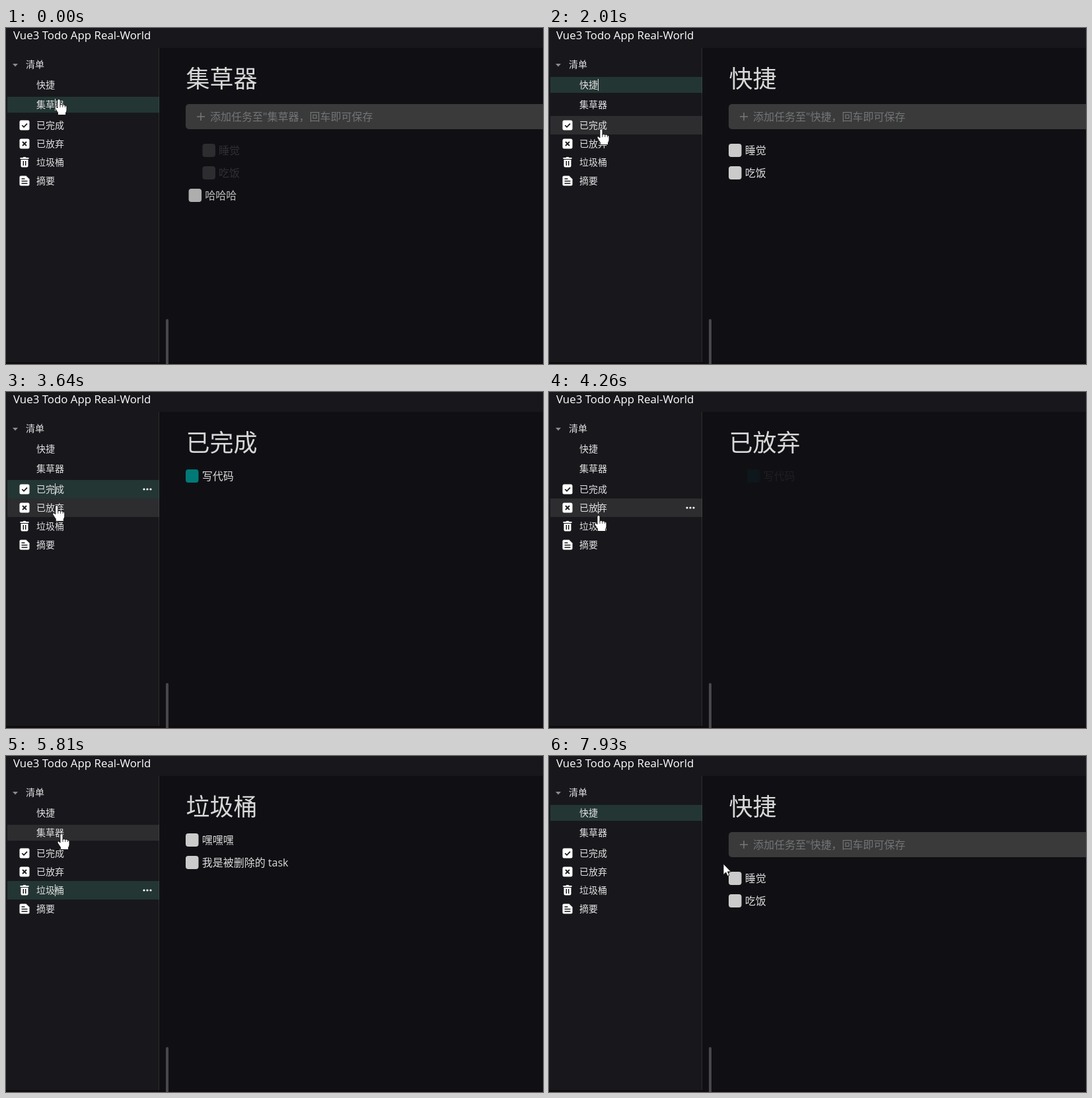
Write an HTML page that moves like this. It is 813x508 px and loops after 8 s.

```html
<!DOCTYPE html>
<html lang="zh-CN">
<head>
<meta charset="utf-8">
<title>Todo App</title>
<style>
  html, body { margin: 0; width: 100%; height: 100%; overflow: hidden; background: #101014; }
  svg { display: block; width: 813px; height: 508px; }
  text { font-family: "Open Sans", "Noto Sans CJK SC", "Noto Sans CJK", sans-serif; white-space: pre; }
</style>
</head>
<body>
<svg viewBox="0 0 813 508" xmlns="http://www.w3.org/2000/svg">
  <rect width="813" height="508" fill="#101014"/>
  <rect width="813" height="30" fill="#18181c"/>
  <rect y="30" width="231" height="478" fill="#18181c"/>
  <rect x="231" y="30" width="1" height="478" fill="#2d2d30"/>
  <rect y="505" width="813" height="3" fill="#100b0d"/>
  <rect x="242" y="440" width="4" height="72" rx="2" fill="#48484b"/>
  <text x="11" y="17" font-size="16.85" fill="#fff">Vue3 Todo App Real-World</text>
  <path d="M10 54h8l-4 4.5z" fill="#8c8c8e"/>
  <text x="30" y="60" font-size="14" font-weight="500" fill="#dedee0">清单</text>
  <g id="scene"></g>
</svg>
<script>
const LOOP = 8000, FRAME = 141.6, DURATION = 500, SHIFT = 30, BLINK = 500, HOVER_FADE = 100;
const scene = document.getElementById('scene');

const lists = [
  { name: '快捷', tasks: ['睡觉', '吃饭'] },
  { name: '集草器', tasks: ['哈哈哈'] }
].map((page, i) => ({ ...page, input: true, y: 74 + 30 * i, h: 24 }));

const folders = [
  { name: '已完成', icon: 'check', box: '#007a77', tasks: ['写代码'] },
  { name: '已放弃', icon: 'cross', tasks: [] },
  { name: '垃圾桶', icon: 'trash', tasks: ['嘿嘿嘿', '我是被删除的 task'] },
  { name: '摘要', icon: 'note', tasks: [] }
].map((page, i) => ({ ...page, y: 133 + 28 * i, h: 28 }));

const pages = [...lists, ...folders];

const clicks = [
  { at: -275, page: 1 }, { at: 960, page: 0 }, { at: 2505, page: 2 }, { at: 3910, page: 3 },
  { at: 4750, page: 4 }, { at: 6180, page: 1 }, { at: 7290, page: 0 }
];

const moves = [
  { from: 580, to: 870, x: 82, y: 82 },
  { from: 1600, to: 1880, x: 79, y: 153 },
  { from: 3340, to: 3700, x: 75, y: 187 },
  { from: 4480, to: 4680, x: 75, y: 200 },
  { from: 5665, to: 5700, x: 84, y: 118 },
  { from: 6700, to: 6790, x: 84, y: 93 },
  { from: 7500, to: 7780, x: 253, y: 161 },
  { from: 7810, to: 7920, x: 264, y: 163 }
];

const tile = '<rect x="20.5" y="-7.5" width="15" height="15" rx="2.5" fill="#fff"/>';
const icons = {
  check: tile + '<path d="M24.3 0l2.7 2.8 5-5.2" fill="none" stroke="#18181c" stroke-width="1.8"/>',
  cross: tile + '<path d="M25-3l6 6m0-6l-6 6" stroke="#18181c" stroke-width="1.8"/>',
  trash: `<path d="M21.5-7h4l1-1h3l1 1h4v2h-13zM22.5-4h11v9.5q0 2-2 2h-7q-2 0-2-2z" fill="#fff"/>
    <path d="M26.3-2v7m3.4-7v7" stroke="#18181c" stroke-width="1.5"/>`,
  note: `<path d="M22.5-7.5h8l5 5v8q0 2-2 2h-11q-2 0-2-2v-11q0-2 2-2z" fill="#fff"/>
    <path d="M23.5-3h5M23.5.5h9M23.5 4h9" stroke="#18181c" stroke-width="1.6"/>`
};

const hand = `<path d="M-2 1.5Q-2-.5 0-.5t2 2v7q0-1 1.8-1t2 1.4q.3-1 1.8-.8 1.7.2 1.8 1.6
  .4-.6 1.4-.3 1.2.4 1.2 1.8v5q0 2-1.5 4v3.3H-1.5V20Q-3.5 17-5.6 13.8-6.6 12-5.4 11T-2 13z"
  fill="#fff" stroke="#111" stroke-width=".9"/>
  <path d="M2 8v4m3.8-3v3m3.6-2v2" stroke="#111" stroke-width=".8"/>`;
const arrow = '<path d="M0 0v16.5l3.8-3.6 2.5 5.6 2.6-1.2-2.4-5.4h5z" fill="#fff" stroke="#111" stroke-width=".9"/>';

const clamp = v => Math.min(1, Math.max(0, v));

const label = (x, y, size, fill, text) =>
  `<text x="${x}" y="${y}" font-size="${size}" font-weight="${size < 16.5 ? 500 : 400}" fill="${fill}">${text}</text>`;

// CSS "ease": cubic-bezier(.25, .1, .25, 1)
function ease(p) {
  if (p <= 0 || p >= 1) return clamp(p);
  const bezier = (a, b, s) => 3 * a * s * (1 - s) ** 2 + 3 * b * s * s * (1 - s) + s ** 3;
  let low = 0, high = 1;
  for (let i = 0; i < 20; i++) {
    const mid = (low + high) / 2;
    if (bezier(.25, .25, mid) < p) low = mid; else high = mid;
  }
  return bezier(.1, 1, low);
}

function pointer(t) {
  let x = 80, y = 108;
  for (const move of moves) {
    const k = clamp((t - move.from) / (move.to - move.from));
    x += (move.x - x) * k;
    y += (move.y - y) * k;
  }
  return { x, y };
}

const inside = (page, { x, y }) => x < 232 && y >= page.y && y < page.y + page.h;

// Share of the recent past spent over the row
function hover(page, t) {
  const samples = 10;
  let share = 0;
  for (let i = 0; i < samples; i++)
    share += inside(page, pointer(t - i * HOVER_FADE / samples)) / samples;
  return share;
}

function menuRow(page, active, caret, t) {
  const mid = page.y + page.h / 2, over = hover(page, t);
  const fill = (color, opacity) =>
    `<rect x="2" y="${page.y}" width="230" height="${page.h}" fill="${color}" opacity="${opacity}"/>`;
  const activeShare = !active ? 0 : page.icon ? 1 - over : 1;
  let out = fill('#63e2b7', .15 * activeShare);
  if (!active || page.icon) out += fill('#fff', .09 * over);
  if (page.icon) out += `<g transform="translate(0 ${mid})">${icons[page.icon]}</g>`;
  out += label(46, mid + 4.5, 14, '#e2e2e4', page.name);
  if (active && page.icon)
    out += [-5, 0, 5].map(dx => `<circle cx="${214 + dx}" cy="${mid}" r="1.6" fill="#fff"/>`).join('');
  if (caret) out += `<rect x="74" y="${mid - 9}" width="1" height="18" fill="#e0e0e0"/>`;
  return out;
}

function task(text, box, row, top, shift, opacity) {
  const y = top + row * 34;
  return `<g transform="translate(${272 + shift} ${y})" opacity="${opacity}">
    <rect y="-10" width="19.5" height="20" rx="4" fill="${box || '#cbcbcb'}"/>
    ${label(24.7, 6, 16, '#dcdcdd', text)}</g>`;
}

function content(page, previous, p) {
  const top = page.input ? 185 : 127, e = ease(p);
  let out = label(272.5, 90, 36, '#d8d8d9', page.name);
  if (page.input)
    out += `<rect x="272" y="115" width="600" height="38" rx="5" fill="#3a3a3a"/>
      <path d="M289 134h12m-6-6v12" stroke="#76787b" stroke-width="1.5"/>
      ${label(309, 140, 16, '#727477', `添加任务至"${page.name}，回车即可保存`)}`;
  const leaving = p < 1 ? previous.tasks : [];
  leaving.forEach((s, i) => out += task(s, previous.box, i, top, SHIFT * e, 1 - e));
  page.tasks.forEach((s, i) =>
    out += task(s, page.box, i + leaving.length, top, SHIFT * (1 - e), e));
  return out;
}

function render(t) {
  const index = clicks.filter(click => click.at <= t).length - 1;
  const current = pages[clicks[index].page];
  const previous = pages[index ? clicks[index - 1].page : 0];
  const age = t - clicks[index].at, caretOn = age % (2 * BLINK) < BLINK;
  const { x, y } = pointer(t);
  scene.innerHTML =
    pages.map(page => menuRow(page, page === current, page === current && caretOn, t)).join('') +
    content(current, previous, age / DURATION) +
    `<g transform="translate(${x} ${y})">${x < 232 ? hand : arrow}</g>`;
}

// The screen refreshes at a low, even rate
let shown = -1;
function tick() {
  const t = Math.floor(performance.now() % LOOP / FRAME) * FRAME;
  if (t !== shown) render(shown = t);
  requestAnimationFrame(tick);
}
tick();
</script>
</body>
</html>
```
